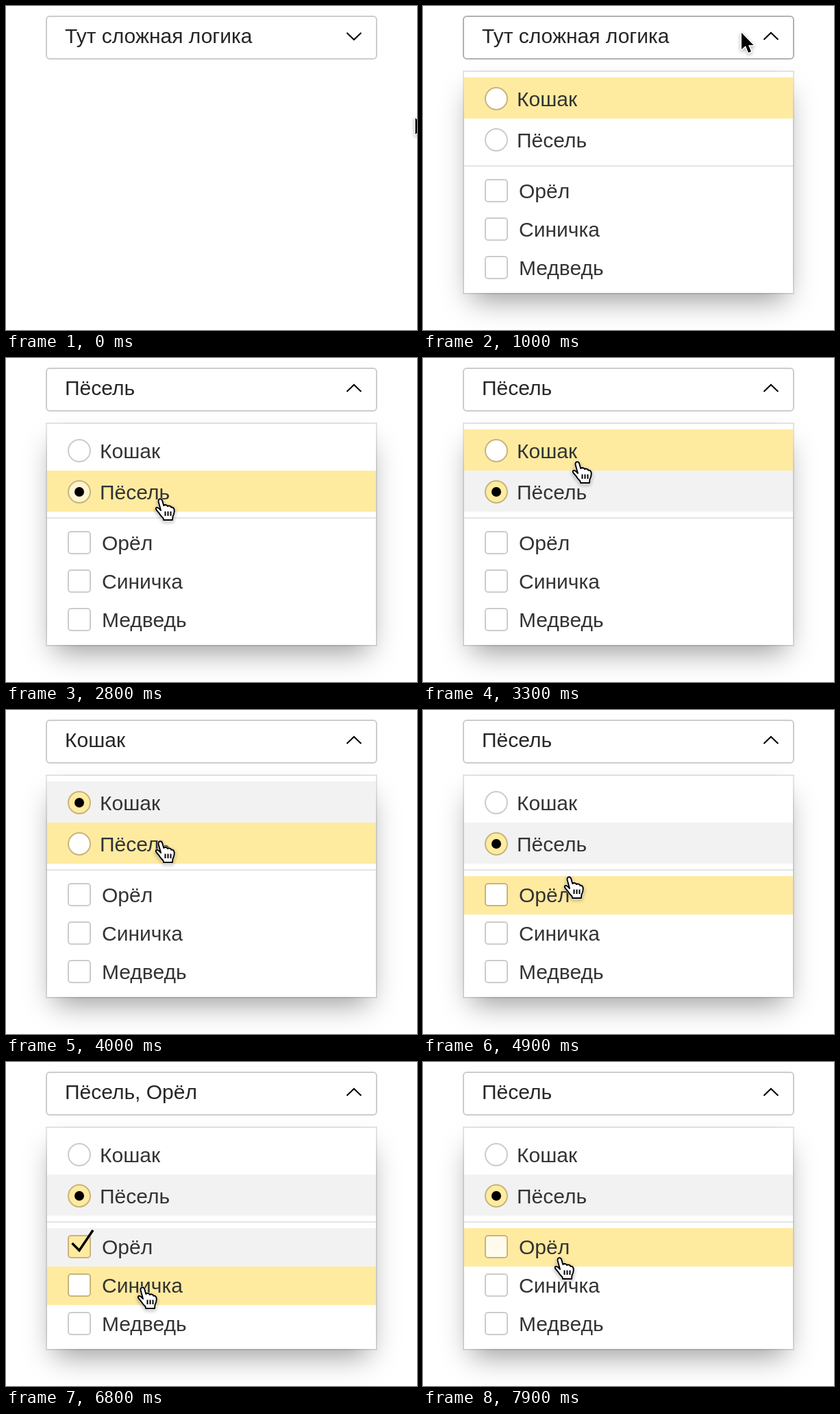
An HTML page with a canvas for the animation above (8000 ms loop, 600 by 472 pixels).

```html
<!DOCTYPE html>
<html lang="ru">
<head>
<meta charset="utf-8">
<title>Выпадающий список</title>
<style>
  html, body { margin: 0; width: 100%; height: 100%; overflow: hidden; background: #fff; }
  canvas { display: block; }
</style>
</head>
<body>
<canvas id="stage" width="600" height="472"></canvas>
<script>
const ctx = document.getElementById('stage').getContext('2d');
const LOOP = 8000, STEP = 100;
const YELLOW = '#ffeba0', TAN = '#c9b47c', GRAY = '#ccc';

const rows = [
  { label: 'Кошак', top: 104, height: 60, radio: true },
  { label: 'Пёсель', top: 164, height: 60, radio: true },
  { label: 'Орёл', top: 242, height: 56 },
  { label: 'Синичка', top: 298, height: 56 },
  { label: 'Медведь', top: 354, height: 56 }
];

// time, row index, new state
const clicks = [
  [2800, 1, true],
  [3500, 1, false], [3500, 0, true],
  [4200, 0, false], [4200, 1, true],
  [5400, 2, true],
  [6100, 3, true], [6400, 3, false],
  [7800, 2, false]
];

// time, x, y of the pointer's hot spot
const path = [
  [100, 597.5, 163], [700, 465, 39],
  [1600, 465, 39], [2100, 130, 173], [2500, 226, 199], [2600, 226, 204],
  [3100, 226, 204], [3300, 226, 150],
  [3800, 226, 204 - 54], [4100, 226, 204],
  [4700, 226, 204], [4900, 214, 242], [5100, 200, 272],
  [5600, 200, 272], [5800, 200, 328],
  [6700, 200, 328], [6800, 200, 327], [7000, 200, 278],
  [7300, 200, 278], [7500, 200, 286], [7600, 200, 284]
];

const arrow = new Path2D('M0 0V24L6 19L10 29L14 27.3L10 18H17.5Z');
const hand = new Path2D('M9 18L5.5 5.5Q5 1.5 8 1.2Q10.5 1 11.3 4L13.3 11' +
  'Q14 9.5 16.5 10Q18.5 10.5 19 12Q20 10.8 22 11.5Q24 12 24.3 13.7' +
  'Q26 13 27.5 14.5Q29 16 28.8 19Q28.6 23 26.5 27L26 32H13L12.5 29.5' +
  'Q8 25 6 21.5Q3 18.5 2 16.5Q1 14.5 3 13.8Q5.5 13.5 9 18Z');
const knuckles = new Path2D('M15.5 19.5V26M19.5 19.5V26M23.5 19.5V26');

const clamp = v => Math.max(0, Math.min(1, v));

function pointerAt(t) {
  const next = path.findIndex(key => key[0] > t);
  if (next === 0) return path[0].slice(1);
  if (next < 0) return path[path.length - 1].slice(1);
  const [t0, x0, y0] = path[next - 1], [t1, x1, y1] = path[next];
  const p = (t - t0) / (t1 - t0), k = p * p * (3 - 2 * p);
  return [x0 + (x1 - x0) * k, y0 + (y1 - y0) * k];
}

function rowState(index, t) {
  const last = clicks.filter(c => c[1] === index && c[0] <= t).pop();
  if (!last) return { on: false, fill: 0 };
  const on = last[2], p = clamp((t - last[0] + STEP) / (on ? 200 : 250));
  return { on, fill: on ? p : 1 - p };
}

function rect(x, y, w, h, color) {
  ctx.fillStyle = color;
  ctx.fillRect(x, y, w, h);
}

function text(str, x, y, color) {
  ctx.font = '30px "Liberation Sans", Arial, sans-serif';
  ctx.fillStyle = color;
  ctx.fillText(str, x, y);
}

function line(points, width) {
  ctx.beginPath();
  points.forEach(([x, y]) => ctx.lineTo(x, y));
  ctx.strokeStyle = '#000';
  ctx.lineWidth = width;
  ctx.stroke();
}

function outline(x, y, w, h, radius, stroke, fill) {
  ctx.beginPath();
  ctx.roundRect(x + 1, y + 1, w - 2, h - 2, radius);
  ctx.fillStyle = fill;
  ctx.fill();
  ctx.strokeStyle = stroke;
  ctx.lineWidth = 2;
  ctx.stroke();
}

function drawHeader(t, hovered, open) {
  const chosen = rows.filter((row, i) => rowState(i, t).on).map(row => row.label);
  outline(58, 14, 484, 64, 5, hovered ? '#b2b2b2' : GRAY, '#fff');
  text(chosen.join(', ') || 'Тут сложная логика', 86, 54, '#262626');
  ctx.save();
  ctx.translate(508, 44);
  ctx.rotate(Math.PI * open);
  line([[-10.5, -5], [0, 5], [10.5, -5]], 2);
  ctx.restore();
}

function drawRow(row, { on, fill }, hovered) {
  const { label, top, height, radio } = row;
  const middle = top + (radio ? 31 : 27);
  if (hovered || on) rect(60, top, 480, height, hovered ? YELLOW : '#f2f2f2');
  outline(90, middle - 17, 34, 34, radio ? 16 : 4, hovered || on ? TAN : GRAY,
    `rgb(255,${255 - 20 * fill},${255 - 95 * fill})`);
  if (on && radio) {
    ctx.beginPath();
    ctx.arc(107, middle, 7, 0, 2 * Math.PI);
    ctx.fillStyle = '#000';
    ctx.fill();
  }
  if (on && !radio) {
    line([[96.5, middle - 5], [107, middle + 5.5], [127, middle - 24]], 3.5);
  }
  text(label, radio ? 137 : 140, middle + 11, '#333');
}

function drawMenu(t, open, hovered) {
  ctx.save();
  ctx.globalAlpha = open;
  ctx.translate(0, -10 * (1 - open));
  ctx.save();
  ctx.shadowColor = 'rgba(0,0,0,.4)';
  ctx.shadowBlur = 40;
  ctx.shadowOffsetY = 20;
  rect(70, 106, 460, 302, '#fff');
  ctx.restore();
  ctx.strokeStyle = 'rgba(0,0,0,.1)';
  ctx.lineWidth = 2;
  ctx.strokeRect(59, 95, 482, 324);
  rect(60, 96, 480, 322, '#fff');
  rect(60, 232, 480, 2, '#e5e5e5');
  rows.forEach((row, i) => drawRow(row, rowState(i, t), row === hovered));
  ctx.restore();
}

function drawPointer(x, y, isHand) {
  ctx.save();
  ctx.translate(isHand ? x - 9 : x, y);
  ctx.lineJoin = 'round';
  ctx.save();
  ctx.shadowColor = 'rgba(0,0,0,.35)';
  ctx.shadowBlur = 5;
  ctx.shadowOffsetY = 2;
  ctx.fillStyle = ctx.strokeStyle = '#fff';
  ctx.lineWidth = 3;
  ctx.stroke(isHand ? hand : arrow);
  ctx.restore();
  ctx.fillStyle = isHand ? '#fff' : '#000';
  ctx.fill(isHand ? hand : arrow);
  if (isHand) {
    ctx.strokeStyle = '#000';
    ctx.lineWidth = 2;
    ctx.stroke(hand);
    ctx.stroke(knuckles);
  }
  ctx.restore();
}

function draw(now) {
  const t = Math.floor(now % LOOP / STEP) * STEP;
  const [x, y] = pointerAt(t);
  const open = clamp((t - 800) / 200);
  const under = open && rows.find(r => y >= r.top && y < r.top + r.height);
  const overHeader = x < 542 && y > 14 && y < 78;

  rect(0, 0, 600, 472, '#fff');
  // The first row has focus until the pointer reaches the list.
  if (open) drawMenu(t, open, y < rows[0].top ? rows[0] : under);
  drawHeader(t, overHeader, open);
  drawPointer(x, y, Boolean(under));
  requestAnimationFrame(frame);
}

const start = performance.now();
function frame() {
  draw(performance.now() - start);
}
frame();
</script>
</body>
</html>
```
